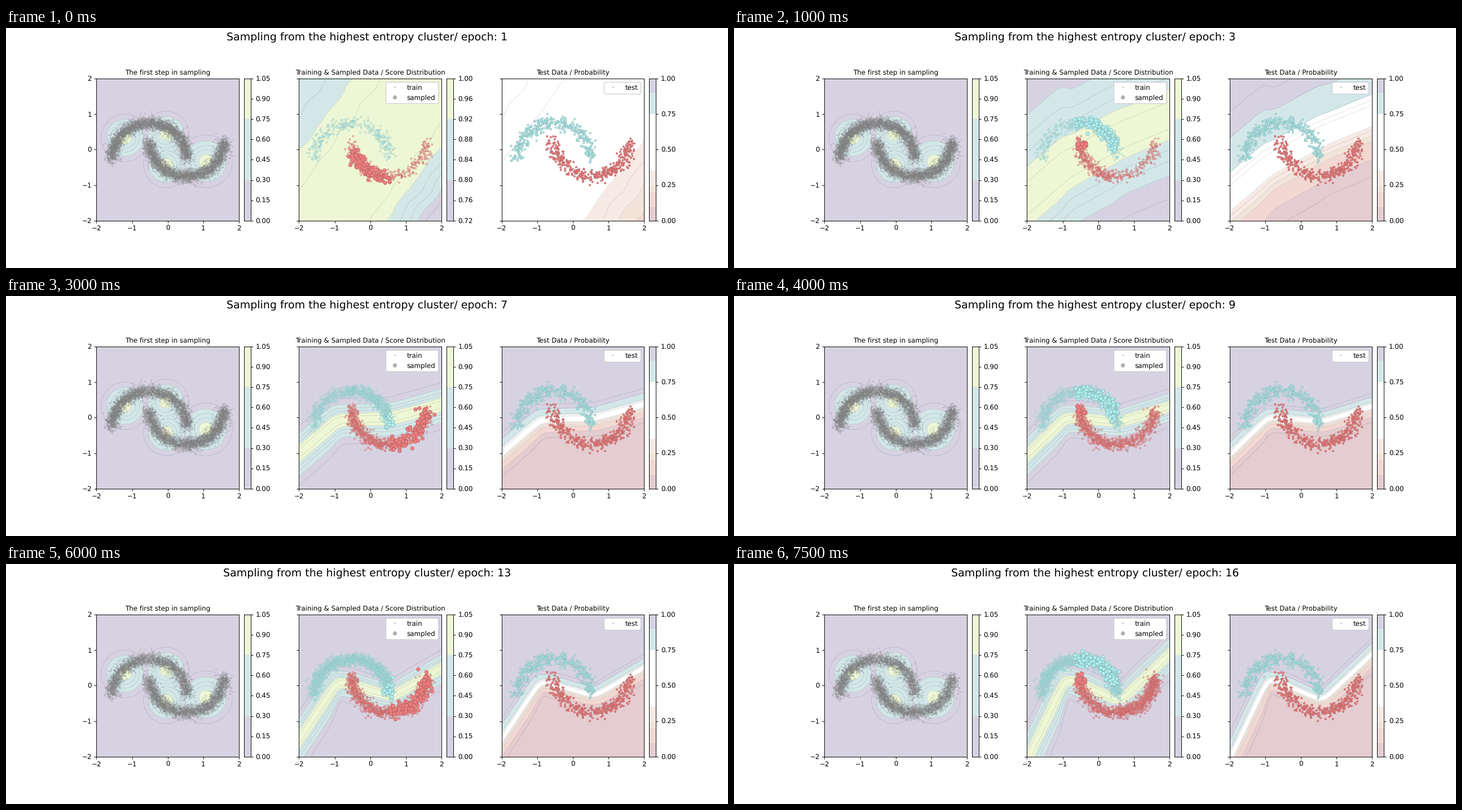
A matplotlib script that plays this animation: 1280x427 px, repeating every 8000 ms.

```python
import numpy as np
import matplotlib.pyplot as plt
from matplotlib.animation import FuncAnimation
from matplotlib.colors import to_rgb
from matplotlib.lines import Line2D

W, H, DPI = 1280, 427, 256 / 3
EPOCHS, BATCH = 16, 150
plt.rcParams.update({"font.family": "DejaVu Sans", "font.size": 10,
                     "text.hinting": "none"})

LAV, CYAN, YELLOW = "#d7d2e2", "#d3e7e9", "#eef7d5"
BLUE, RED = "#afeeee", "#f08080"
SCORE_FILLS = [LAV, CYAN, YELLOW]
PROB_EDGES = [0, 0.1, 0.2, 0.25, 0.35, 0.75, 0.9, 1]
PROB_FILLS = ["#e4ccd1", "#f2d7d3", "#f2e4d8", "#f7eae4", "white", CYAN, LAV]
PROB_LINES = [0.05, 0.1, 0.2, 0.25, 0.3, 0.35, 0.65, 0.7, 0.75, 0.9, 0.95]

rng = np.random.default_rng(7)


def shade(color, k):
    return tuple(k * v for v in to_rgb(color))


def moons(n, noise=0.092):
    """Two interleaved arcs; returns points and a mask of the upper arc."""
    t = rng.uniform(0, np.pi, n)
    upper = np.arange(n) % 2 == 0
    side = np.where(upper, 1, -1)
    pts = np.c_[side * (np.cos(t) - 0.5) * 1.05, side * (np.sin(t) - 0.25)]
    return pts + rng.normal(0, noise, (n, 2)), upper


# ---- data: pool, starting training set, test set
pool, pool_up = moons(8000)
train, train_up = moons(600)
test, test_up = moons(740)

# clusters A to D: centre x, centre y, spread
CLUSTERS = np.array([(-1.2, 0.33, 0.36), (-0.05, 0.43, 0.35),
                     (-0.03, -0.42, 0.35), (1.07, -0.33, 0.4)])
ORDER = "CBBCBADDBADADDBB"

dist = np.linalg.norm(pool[:, None] - CLUSTERS[:, :2], axis=2)
dist[pool_up, 2] = np.inf
label = dist.argmin(axis=1)

free = np.ones(len(pool), bool)
batches = []
for name in ORDER:
    members = np.flatnonzero(free & (label == "ABCD".index(name)))
    batches.append(rng.choice(members, BATCH, replace=False))
    free[batches[-1]] = False

# ---- classifier
xs = np.linspace(-2, 2, 141)
X, Y = np.meshgrid(xs, xs)


def bend(x, soft=0.08):
    """Smooth version of max(x, 0)."""
    return soft * np.logaddexp(0, x / soft)


def first_logit():
    n = Y - 1.35 * X + 0.05 * np.sin(4 * (X + Y)) + 0.03 * np.sin(9 * Y)
    return 0.1 + 0.265 * n - 0.016 * n ** 2


def later_logit(epoch):
    """Signed distance to a boundary of three slopes that sharpens with time."""
    s = (epoch - 7) / 9
    early = np.exp(-0.66 * (epoch - 3))
    left = 0.86 + 1.25 * max(s, 0) ** 1.6
    mid = -0.45 * s + 0.35 * early
    right = 0.28 + 0.67 * s ** 2
    edge = (-0.03 - 0.13 * s + mid * xs
            - (left - mid) * bend(-0.9 - xs) + (right - mid) * bend(xs - 0.6))
    up = (0.31 + 1.5 * early) * np.hypot(1, np.gradient(edge, xs))
    down = up * (1.25 - 0.4 * early ** 0.75)
    d = Y - edge
    return 2.88 * np.sign(d) * (np.abs(d) / np.where(d > 0, up, down)) ** 0.85


def probability(epoch):
    k = min((epoch - 1) / 2, 1)
    z = (1 - k) * first_logit() + k * later_logit(max(epoch, 3))
    return 1 / (1 + np.exp(-np.clip(z, -14, 14)))


def entropy(p):
    return -(p * np.log2(p) + (1 - p) * np.log2(1 - p))


# ---- drawing
fig = plt.figure(figsize=(W / DPI, 1281 / 256), dpi=DPI, facecolor="white")
headline = fig.suptitle("", fontsize=16, y=0.9825)


def add_axes(x, width):
    return fig.add_axes([x / W, (H - 342.8) / H, width / W, 253 / H])


def dress(ax, title, labels=False):
    ax.clear()
    ax.set(xlim=(-2, 2), ylim=(-2, 2), xticks=range(-2, 3), yticks=range(-2, 3))
    ax.set_title(title, fontsize=10)
    ax.tick_params(labelleft=labels)


def color_bar(ax, edges, fills, ticks):
    ax.clear()
    for a, b, c in zip(edges, edges[1:], fills):
        ax.axhspan(a, b, color=c, lw=0)
    ax.set(ylim=(edges[0], edges[-1]), xticks=[], yticks=ticks)
    ax.set_yticklabels([f"{t:.2f}" for t in ticks])
    ax.yaxis.tick_right()


def contours(ax, field, edges, fills, lines):
    bands = np.searchsorted(edges, lines, side="right") - 1
    ax.contourf(X, Y, field, levels=edges, colors=fills)
    ax.contour(X, Y, field, levels=lines, linewidths=0.6,
               colors=[shade(fills[b], 0.85) for b in bands])


def score_map(ax, bar, field, lo, step):
    ticks = lo + step * np.arange(8)
    edges = ticks[[0, 2, 5, 7]]
    contours(ax, np.clip(field, lo + 1e-6, None), edges, SCORE_FILLS, ticks[1:-1])
    color_bar(bar, edges, SCORE_FILLS, ticks)


def dots(ax, pts, upper, size, alpha):
    faces = [BLUE if u else RED for u in upper]
    ax.scatter(*pts.T, s=size, c=faces, edgecolors=[shade(c, 0.7) for c in faces],
               linewidths=0.45, alpha=alpha, zorder=3)


def legend(ax, *items):
    handles = [Line2D([], [], ls="", marker="o", ms=ms, mew=0.4, color="gray",
                      alpha=0.6, label=name) for name, ms in items]
    ax.legend(handles=handles, loc="upper right", framealpha=1).set_zorder(5)


(ax1, bar1), (ax2, bar2), (ax3, bar3) = [
    (add_axes(x, 252.8), add_axes(x + 261.3, 12.7)) for x in 160.3 + 359.1 * np.arange(3)]

dress(ax1, "The first step in sampling", labels=True)
cx, cy, spread = CLUSTERS.T
r2 = (X[..., None] - cx) ** 2 + (Y[..., None] - cy) ** 2
density = 0.84 * np.exp(-r2 / (2 * spread ** 2)).max(axis=-1)
score_map(ax1, bar1, density, 0, 0.15)
pool_dots = ax1.scatter(*pool.T, s=5, c="gray", edgecolors="gray",
                        linewidths=0.4, alpha=0.2, zorder=3)
color_bar(bar3, PROB_EDGES, PROB_FILLS, np.linspace(0, 1, 5))


def update(i):
    epoch = i + 1
    headline.set_text(f"Sampling from the highest entropy cluster/ epoch: {epoch}")
    used = np.concatenate([np.empty(0, int)] + batches[:i])
    pool_dots.set_offsets(np.delete(pool, used, axis=0))

    p = probability(epoch)
    dress(ax2, "Training & Sampled Data / Score Distribution")
    score_map(ax2, bar2, entropy(p), *((0.72, 0.04) if i == 0 else (0, 0.15)))
    dots(ax2, np.r_[train, pool[used]], np.r_[train_up, pool_up[used]], 8, 0.5)
    dots(ax2, pool[batches[i]], pool_up[batches[i]], 30, 1)
    legend(ax2, ("train", 1.5), ("sampled", 5.8))

    dress(ax3, "Test Data / Probability")
    contours(ax3, p, PROB_EDGES, PROB_FILLS, PROB_LINES)
    dots(ax3, test, test_up, 8, 1)
    legend(ax3, ("test", 1.5))
    return []


anim = FuncAnimation(fig, update, frames=EPOCHS, interval=500, repeat=True,
                     repeat_delay=0, blit=False)
plt.show()
```
